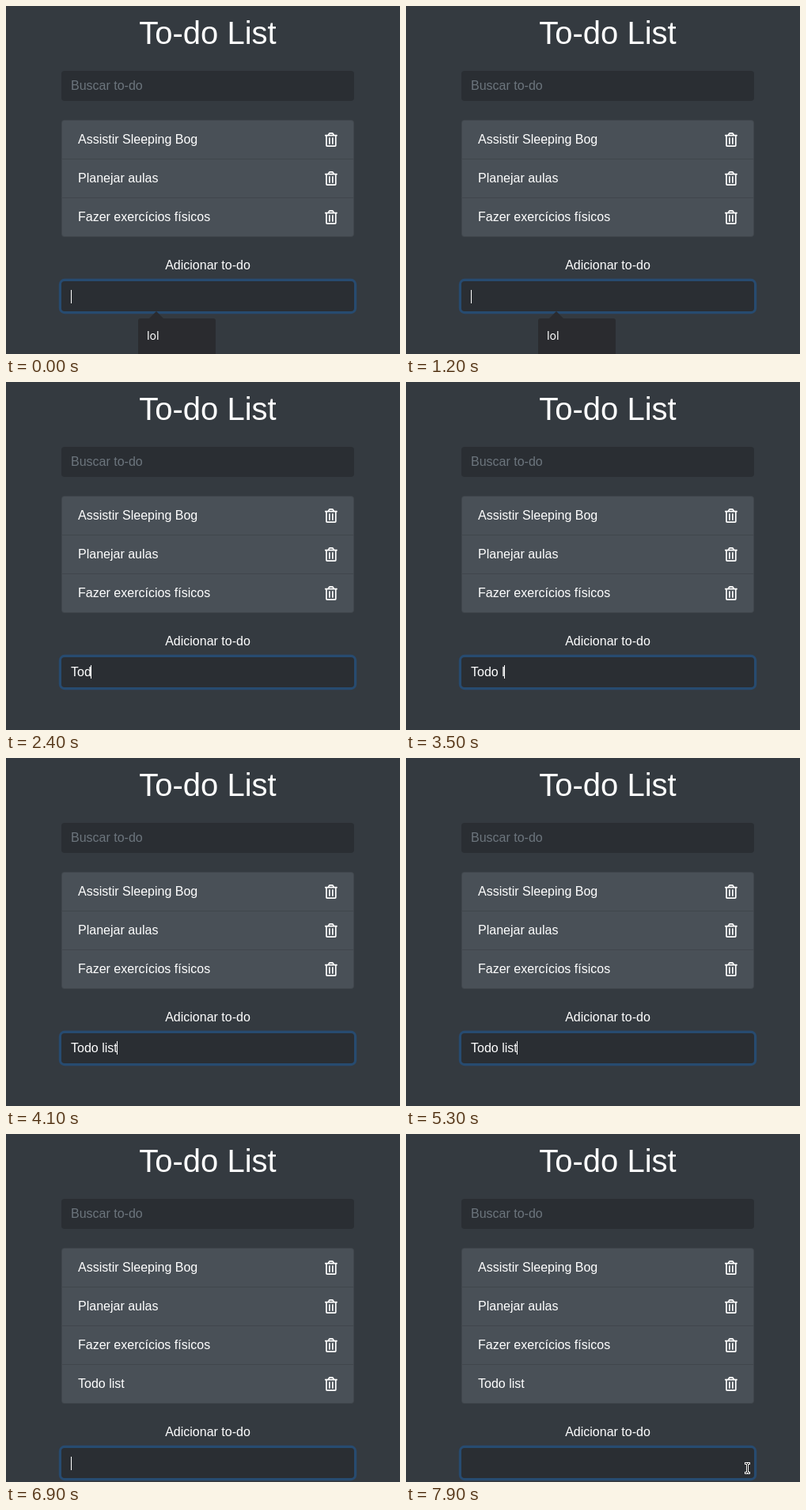
These frames come from a looping animation (498 by 440 pixels, 8 s). An HTML page:

```html
<!DOCTYPE html>
<html lang="pt">
<head>
<meta charset="utf-8">
<title>To-do List</title>
<style>
* { box-sizing: border-box; }
html, body { margin: 0; width: 498px; height: 440px; overflow: hidden; }
body {
  position: relative;
  background: #343a40;
  color: #fff;
  font: 16px/24px "Liberation Sans", Arial, sans-serif;
}
main { position: absolute; left: 70px; top: 10px; width: 370px; }
h1 { margin: 0 0 24px; font-size: 40px; font-weight: 400; line-height: 48px; text-align: center; }
.field {
  position: relative;
  height: 38px;
  padding: 7px 12px;
  border-radius: 4px;
  background: #2a2e33;
  white-space: pre;
}
.search { color: #6c757d; }
.add { box-shadow: 0 0 0 3.2px rgba(0, 123, 255, .25); }
ul { margin: 24px 0; padding: 0; list-style: none; }
li {
  display: flex;
  justify-content: space-between;
  align-items: center;
  height: 50px;
  margin-bottom: -1px;
  padding: 0 20px;
  border: 1px solid rgba(0, 0, 0, .125);
  background: #495057;
}
li:first-child { border-radius: 4px 4px 0 0; }
li.last { margin-bottom: 0; border-radius: 0 0 4px 4px; }
li svg { width: 15.75px; height: 18px; }
.label { margin-bottom: 8px; text-align: center; }
#caret { position: absolute; width: 1px; height: 17px; background: #fff; }
#popup {
  position: absolute;
  left: 167px;
  top: 395px;
  height: 60px;
  padding: 10px 11px;
  border-radius: 3px;
  background: #2a2b2f;
  font: 14px/24px "Noto Sans", "Open Sans", sans-serif;
}
#popup::before {
  content: "";
  position: absolute;
  left: 14px;
  top: -9px;
  border: solid transparent;
  border-width: 0 9px 9px;
  border-bottom-color: #2a2b2f;
}
.pointer { position: absolute; overflow: visible; }
[hidden] { display: none !important; }
</style>
</head>
<body>
<svg width="0" height="0" style="position:absolute">
  <symbol id="trash" viewBox="0 0 448 512">
    <g fill="none" stroke="#fff" stroke-width="48" stroke-linejoin="round">
      <path d="M16 104H432" stroke-linecap="round"/>
      <path d="M56 104V464Q56 488 80 488H368Q392 488 392 464V104"/>
      <path d="M126 92L160 36Q166 24 180 24H268Q282 24 288 36L322 92"/>
      <path d="M168 176V416M280 176V416"/>
    </g>
  </symbol>
</svg>
<main>
  <h1>To-do List</h1>
  <div class="field search">Buscar to-do</div>
  <ul id="list"></ul>
  <div class="label">Adicionar to-do</div>
  <div class="field add"><span id="typed"></span><i id="caret"></i></div>
</main>
<div id="popup"></div>
<svg id="arrow" class="pointer" style="left:441px;top:427px" width="11" height="17">
  <path d="M.5 .5V13.5L3.5 10.7L5.8 15.8L7.8 15L5.6 10H9.5Z" fill="#000" stroke="#fff"/>
</svg>
<svg id="beam" class="pointer" style="left:428px;top:415px" width="7" height="15">
  <g fill="none" stroke-linecap="square">
    <path id="bar" d="M1.5 1.5H2.5M4.5 1.5H5.5M3.5 2.5V12.5M1.5 13.5H2.5M4.5 13.5H5.5" stroke="#fff" stroke-width="3"/>
    <use href="#bar" style="display:none"/>
    <path d="M1.5 1.5H2.5M4.5 1.5H5.5M3.5 2.5V12.5M1.5 13.5H2.5M4.5 13.5H5.5" stroke="#000" stroke-width="1"/>
  </g>
</svg>
<script>
const LOOP = 8000, SUBMIT = 6900;
const $ = id => document.getElementById(id);

// [start ms, field text, caret shown]
const steps = [
  [0, "", 1], [500, "", 0], [1200, "", 1],
  [1700, "T", 1], [2000, "To", 1], [2200, "Tod", 1], [2800, "Tod", 0],
  [2900, "Todo", 1], [3100, "Todo ", 1], [3500, "Todo l", 1],
  [3700, "Todo li", 1], [3800, "Todo lis", 1], [4100, "Todo list", 1],
  [4700, "Todo list", 0], [5300, "Todo list", 1],
  [5700, "Todo list ", 1], [6300, "Todo list ", 0],
  [SUBMIT, "", 1], [7500, "", 0]
];

const todos = ["Assistir Sleeping Bog", "Planejar aulas", "Fazer exercícios físicos", "Todo list"];
$("list").innerHTML = todos
  .map(t => `<li><span>${t}</span><svg><use href="#trash"/></svg></li>`).join("");
const items = [...$("list").children];

function drawField(t) {
  const [, text, on] = steps.filter(s => s[0] <= t).pop();
  const typed = $("typed"), caret = $("caret");
  if (typed.textContent !== text) typed.textContent = text;
  caret.hidden = !on;
  caret.style.left = 12 + Math.floor(typed.getBoundingClientRect().width) + "px";
  caret.style.top = (text ? 10 : 11) + "px";
}

function drawPopup(t) {
  const popup = $("popup"), first = t < 2000;
  popup.textContent = first ? "lol" : "top";
  popup.style.width = (first ? 98 : 62) + "px";
  const fade = t < 2200 ? 0 : Math.floor((t - 2100) / 100);
  popup.style.opacity = Math.max(0, 1 - fade / 3);
}

function draw(t) {
  const added = t >= SUBMIT;
  items[3].hidden = !added;
  items[2].classList.toggle("last", !added);
  items[3].classList.toggle("last", added);
  drawField(t);
  drawPopup(t);
  $("arrow").toggleAttribute("hidden", t < 7800 || t >= 7900);
  $("beam").toggleAttribute("hidden", t < 7900);
}

const start = performance.now();
function tick() {
  draw((performance.now() - start) % LOOP);
  requestAnimationFrame(tick);
}
tick();
</script>
</body>
</html>
```
